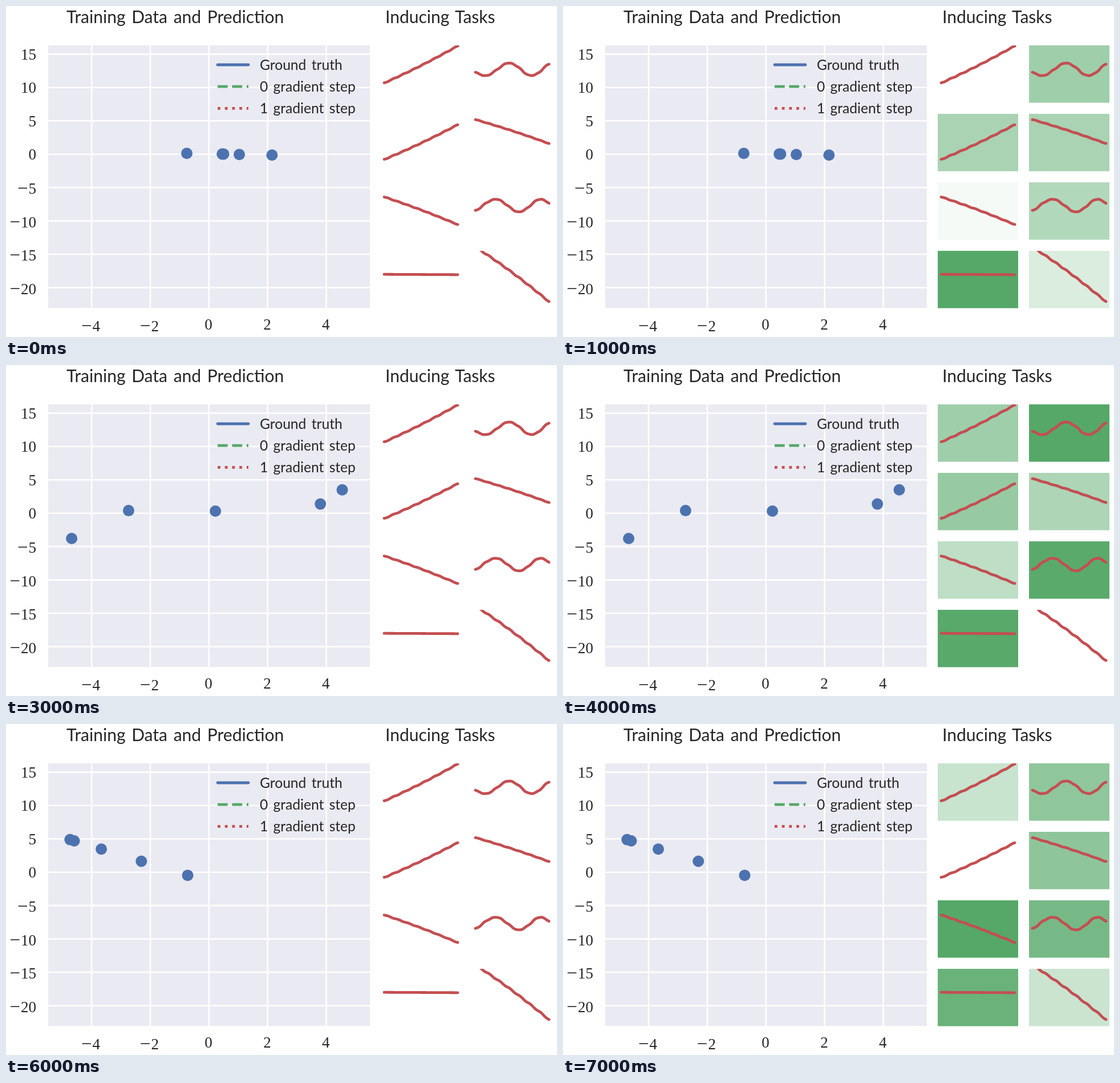
Write an HTML page that moves like this. It is 966 by 580 pixels and loops after 8 s.

```html
<!DOCTYPE html>
<html lang="en">
<head>
<meta charset="utf-8">
<title>Inducing Tasks</title>
<style>
html, body { margin: 0; width: 100%; height: 100%; overflow: hidden; background: #fff; }
svg { display: block; }
text { fill: #262626; font-variant-ligatures: none; }
.title { font: 30px Lato, sans-serif; word-spacing: 3px; }
.key { font: 24.6px Lato, sans-serif; word-spacing: 3px; }
.tick { font: 27px "Liberation Serif", serif; }
.minus { font: 33px "Liberation Serif", serif; text-anchor: end; }
.line { fill: none; stroke-width: 4.8; stroke-linejoin: round; }
.blue { stroke: #4c72b0; stroke-linecap: round; }
.green { stroke: #55a868; stroke-dasharray: 17.7 7.7; }
.red { stroke: #c44e52; stroke-dasharray: 4.8 7.92; }
.task { stroke: #c44e52; stroke-linecap: round; }
.dot { fill: #4c72b0; }
.cell, .band { fill: #55a868; }
.band { opacity: .22; }

.scene, .cells, .fit { animation: 8s step-end infinite; }
.scene0 { animation-name: first; }
.scene1 { animation-name: second; }
.scene2 { animation-name: third; }
.scene0 .cells { animation-name: at1; }
.scene0 .fit { animation-name: at2; }
.scene1 .cells { animation-name: at4; }
.scene1 .fit { animation-name: at5; }
.scene2 .cells { animation-name: at7; }
@keyframes first { 0% { opacity: 1 } 37.5%, to { opacity: 0 } }
@keyframes second { 0% { opacity: 0 } 37.5% { opacity: 1 } 75%, to { opacity: 0 } }
@keyframes third { 0% { opacity: 0 } 75%, to { opacity: 1 } }
@keyframes at1 { 0% { opacity: 0 } 12.5%, to { opacity: 1 } }
@keyframes at2 { 0% { opacity: 0 } 25%, to { opacity: 1 } }
@keyframes at4 { 0% { opacity: 0 } 50%, to { opacity: 1 } }
@keyframes at5 { 0% { opacity: 0 } 62.5%, to { opacity: 1 } }
@keyframes at7 { 0% { opacity: 0 } 87.5%, to { opacity: 1 } }
</style>
</head>
<body>
<svg id="stage" width="966" height="580" viewBox="0 0 966 580"></svg>
<script>
const { sin, cos, exp, abs, PI } = Math;
const px = x => 355.8 + 51.42 * x;
const py = y => 259.7 - 11.69 * y;

const text = (cls, x, y, str) => `<text class="${cls}" x="${x}" y="${y}">${str}</text>`;
const line = (cls, points) => `<polyline class="line ${cls}" points="${points}"/>`;
const grid = d => `<path d="${d}" stroke="#fff" stroke-width="2.6"/>`;

// Runs u from 0 to 1 and joins the points that at(u) returns.
function trace(at, steps = 100) {
  return Array.from({ length: steps + 1 }, (_, i) =>
    at(i / steps).map(v => v.toFixed(2)).join()).join(' ');
}

function number(n, x, y) {
  return (n < 0 ? text('minus', x - 1, y + 1, '\u2212') : '') + text('tick', x, y, abs(n));
}

function axes() {
  let out = '<rect x="74" y="69" width="564" height="460" fill="#eaeaf2"/>';
  for (let n = -4; n <= 4; n += 2) {
    out += grid(`M${px(n)} 69V529`);
    out += number(n, px(n) + (n < 0 ? 1.5 : -7.5), n < 0 ? 570 : 567);
  }
  for (let n = -20; n <= 15; n += 5) {
    out += grid(`M74 ${py(n)}H638`);
    out += number(n, abs(n) < 10 ? 39.5 : 26, py(n) + (n < 0 ? 11 : 9.5));
  }
  return out;
}

function legend() {
  const rows = { blue: 'Ground truth', green: '0 gradient step', red: '1 gradient step' };
  return Object.entries(rows).map(([cls, label], i) => {
    const y = 103 + 38.2 * i;
    return line(cls, `371,${y} 425,${y}`) + text('key', 445, y + 9, label);
  }).join('');
}

const curve = fn => trace(u => [px(10 * u - 5), py(fn(10 * u - 5))]);

function fit({ truth, guess }) {
  const edge = (dir, side) => trace(u => {
    const x = dir * (10 * u - 5);
    return [px(x), py(guess(x) + side * .25)];
  });
  return `<g class="fit"><polygon class="band" points="${edge(1, 1)} ${edge(-1, -1)}"/>`
    + line('blue', curve(truth)) + line('green', curve(guess)) + line('red', curve(guess)) + '</g>';
}

const cellX = i => 657 + 160 * (i % 2);
const cellY = i => 69 + 120 * (i >> 1);
const cell = (i, alpha = 1) =>
  `<rect class="cell" x="${cellX(i)}" y="${cellY(i)}" width="141" height="100.5" fill-opacity="${alpha}"/>`;

const flat = x => .13 * cos(x + .9);
const wave = x => 3.93 * cos(x + 1.27);

const scenes = [
  {
    xs: [-.755, .455, .5, 1.035, 2.15],
    shades: [0, .56, .5, .5, .06, .45, 1, .21],
    truth: flat,
    guess: x => 1.7 * flat(x)
  },
  {
    xs: [-4.68, -2.74, .22, 3.8, 4.545],
    shades: [.56, 1, .61, .48, .38, .97, .98, 0],
    truth: wave,
    guess: x => wave(x) - .07 - .3 * exp(-10 * (x + 5))
  },
  {
    xs: [-4.735, -4.595, -3.67, -2.305, -.725],
    shades: [.32, .65, 0, .66, 1, .8, .88, .31],
    truth: x => -1.335 * x - 1.436
  }
];

function scene(s, i) {
  const dots = s.xs.map(x => `<circle class="dot" cx="${px(x)}" cy="${py(s.truth(x))}" r="10"/>`);
  const cells = s.shades.map((alpha, j) => cell(j, alpha));
  return `<g class="scene scene${i}"><g class="cells">${cells.join('')}</g>${dots.join('')}${s.guess ? fit(s) : ''}</g>`;
}

// All tasks share the same slightly uneven sampling.
const warp = u => u - .03 * sin(PI * u) + .008 * sin(45 * u + 2.4);
const ramp = (from, to) => w => from + (to - from) * w;
const ripple = (mid, crest) => w => mid - 11 * cos(10 * (w - crest));

const tasks = [
  ramp(66, 1), ripple(42, .43),
  ramp(80, 19), ramp(10, 52),
  ramp(25.5, 74), ripple(40.7, .25),
  ramp(41.2, 41.8), ramp(-7, 89)
];

function task(fn, i) {
  const points = trace(u => [cellX(i) + 6 + 129 * u, cellY(i) + fn(warp(u))]);
  return `<clipPath id="clip${i}">${cell(i)}</clipPath><g clip-path="url(#clip${i})">${line('task', points)}</g>`;
}

document.getElementById('stage').innerHTML =
  text('title', 106, 30, 'Training Data and Prediction')
  + text('title', 665, 30, 'Inducing Tasks')
  + axes()
  + scenes.map(scene).join('')
  + tasks.map(task).join('')
  + legend();
</script>
</body>
</html>
```
